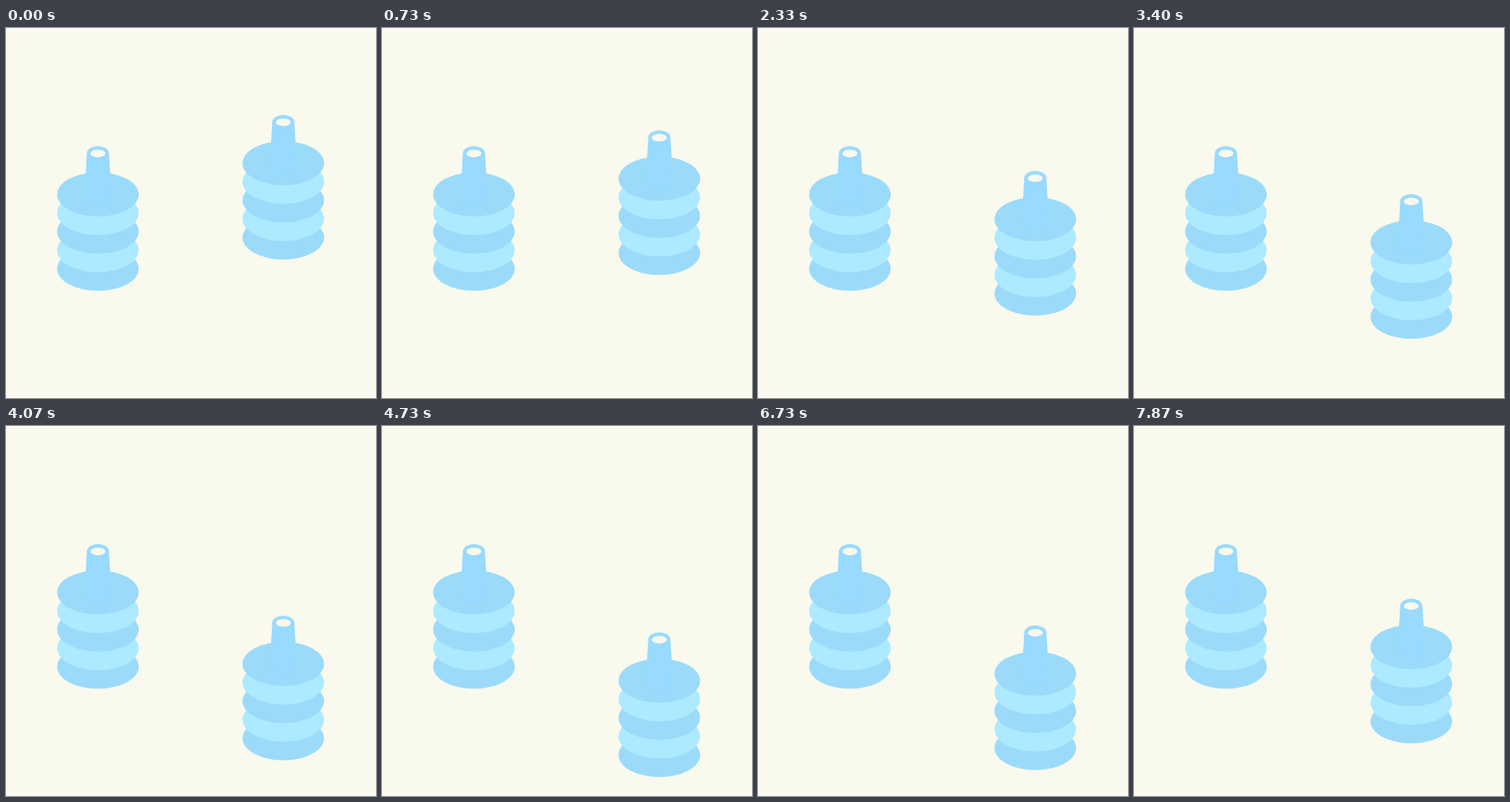
An HTML page for the animation above (8 s loop, 479 by 478 pixels).

```html
<!DOCTYPE html>
<html lang="en">
<head>
<meta charset="utf-8">
<title>Two bottles</title>
<style>
  html, body { margin: 0; width: 100%; height: 100%; overflow: hidden; background: #f9f9ed; }
  svg { display: block; width: 479px; height: 478px; }
</style>
</head>
<body>
<svg viewBox="0 0 479 478">
  <defs>
    <g id="bottle">
      <g id="rings"></g>
      <path d="M-14.3 162 L-17.4 213 A17.4 18.5 0 0 0 17.4 213 L14.3 162 Z" fill="#99daff"/>
      <ellipse cy="161.8" rx="14.3" ry="9.2" fill="#99daff"/>
      <ellipse cy="162.1" rx="9.7" ry="4.9" fill="#f9f9ed"/>
    </g>
  </defs>
  <rect width="479" height="478" fill="#f9f9ed"/>
  <use href="#bottle" x="119"/>
  <use href="#bottle" id="mover" x="359"/>
</svg>
<script>
const LOOP = 8000, STEP = 1000 / 15;

// Key points of the drift: [tick, vertical offset], joined by straight lines.
const path = [
  [1, -40.3], [6, -27], [8, -27], [21, 1.5], [35, 32], [45, 52], [47, 52],
  [51, 62], [59, 88], [71, 114], [86, 140.5], [90, 139.7], [101, 105],
  [113, 83.5], [118, 70.5]
];

const rings = document.getElementById("rings");
const mover = document.getElementById("mover");

// Stacked from the bottom up, in alternating shades.
for (let i = 4; i >= 0; i--) {
  const ring = document.createElementNS("http://www.w3.org/2000/svg", "ellipse");
  ring.setAttribute("cy", 215 + 24 * i);
  ring.setAttribute("rx", 52.8);
  ring.setAttribute("ry", 28.5);
  ring.setAttribute("fill", i % 2 ? "#adeaff" : "#9bdbf9");
  rings.appendChild(ring);
}

function offsetAt(tick) {
  const next = path.findIndex(([t]) => t >= tick);
  if (next < 0) return path[path.length - 1][1];
  if (next === 0) return path[0][1];
  const [t0, y0] = path[next - 1], [t1, y1] = path[next];
  return y0 + (y1 - y0) * (tick - t0) / (t1 - t0);
}

function draw(ms) {
  // The small lead absorbs rounding of the tick times.
  const tick = Math.floor((ms % LOOP + 4) / STEP) % 120;
  mover.setAttribute("y", offsetAt(tick));
}

const begin = performance.now();
function frame() {
  draw(performance.now() - begin);
  requestAnimationFrame(frame);
}
draw(0);
requestAnimationFrame(frame);
</script>
</body>
</html>
```
